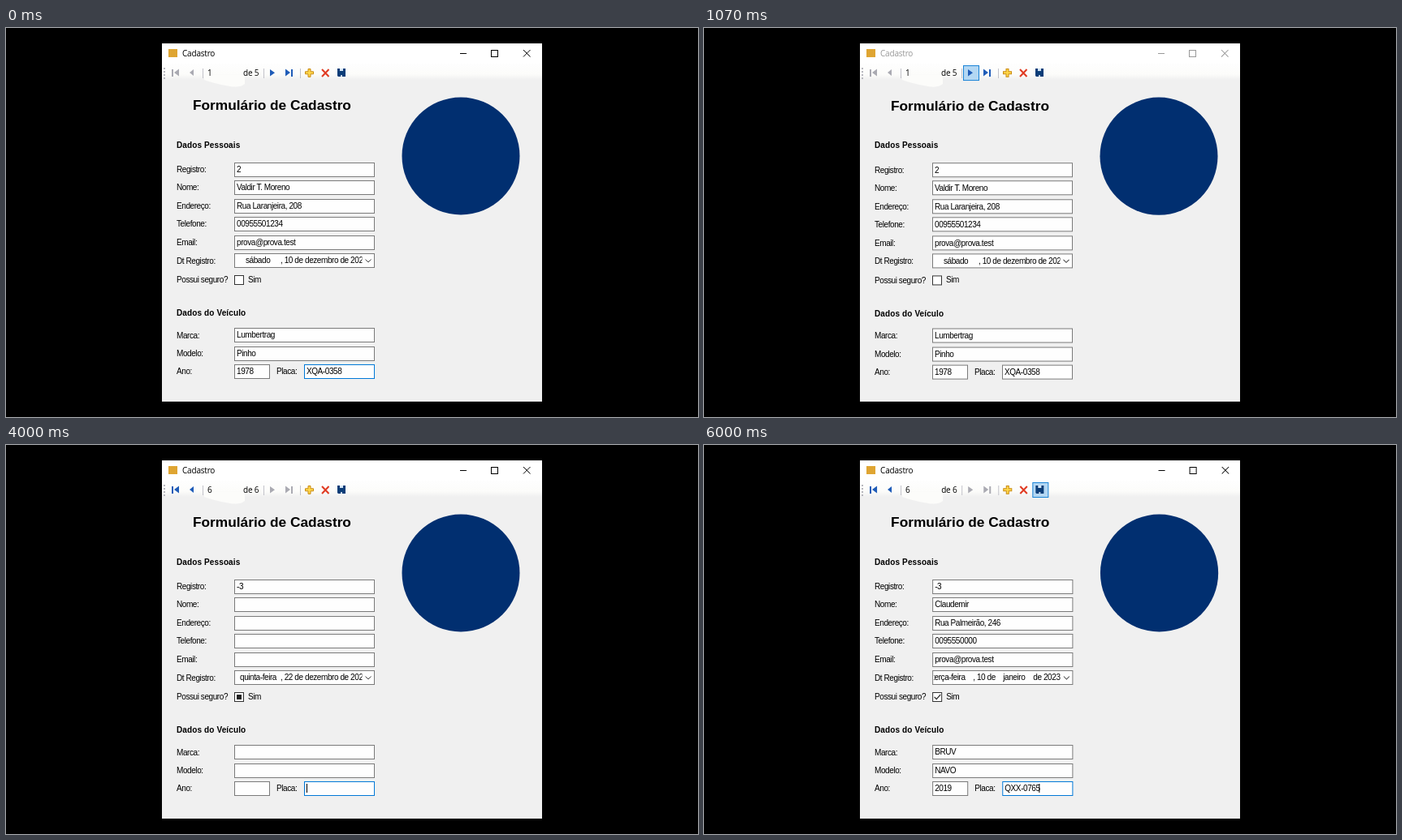
These frames come from a looping animation (852x480 px, 8 s). An HTML page:

```html
<!DOCTYPE html>
<html lang="pt-BR">
<head>
<meta charset="utf-8">
<title>Cadastro</title>
<style>
  html, body { margin: 0; width: 100%; height: 100%; overflow: hidden; background: #000; }
  svg { display: block; width: 100vw; height: 100vh; }
  text { font: 10px "Liberation Sans", Arial, sans-serif; letter-spacing: -.42px; fill: #000; }
  .head { font-size: 17.3px; font-weight: bold; letter-spacing: 0; }
  .sub { font-weight: bold; letter-spacing: .12px; }
  .ui { font: 10px "Open Sans", "Noto Sans", sans-serif; letter-spacing: -.2px; }
</style>
</head>
<body>
<svg viewBox="0 0 852 480">
  <defs>
    <linearGradient id="bar" x2="0" y2="1">
      <stop offset="0" stop-color="#fefefe"/>
      <stop offset=".65" stop-color="#fcfcfa"/>
      <stop offset="1" stop-color="#f0f0f0"/>
    </linearGradient>
    <clipPath id="window"><rect x="192" y="19" width="468" height="442"/></clipPath>
    <clipPath id="date"><rect x="283" y="279" width="155.5" height="17"/></clipPath>
  </defs>
  <rect width="852" height="480"/>
  <g clip-path="url(#window)">
    <rect x="192" y="19" width="468" height="442" fill="#f0f0f0"/>
    <g id="form"></g>
  </g>
</svg>
<script>
const LOOP = 8000;
const BLUE = '#1f5cb8', GREY = '#aaaab2', NAVY = '#012f70';

const first = {
  pos: 1, total: 5, check: 'off',
  fields: ['2', 'Valdir T. Moreno', 'Rua Laranjeira, 208', '00955501234', 'prova@prova.test'],
  date: [[295, 'sábado'], [338, ', 10 de dezembro de 2022']],
  car: ['Lumbertrag', 'Pinho', '1978', 'XQA-0358']
};
const second = {
  pos: 2, total: 5, check: 'on',
  fields: ['3', 'Marlucia de Campos', 'Av. Ipê Sul', '00955506789', ''],
  date: [[288, 'quinta-feira'], [338, ', 22 de dezembro de 2022']],
  car: ['Bruv', 'Lio Tar', '2014', 'XQT-0000']
};
const blank = {
  pos: 6, total: 6, check: 'mixed',
  fields: ['-3', '', '', '', ''],
  date: second.date,
  car: ['', '', '', '']
};
const filled = {
  pos: 6, total: 6, check: 'on',
  fields: ['-3', 'Claudemir', 'Rua Palmeirão, 246', '0095550000', 'prova@prova.test'],
  date: [[281, 'terça-feira'], [331, ', 10 de'], [368, 'janeiro'], [405, 'de 2023']],
  car: ['BRUV', 'NAVO', '2019', 'QXX-0765']
};

const scenes = [
  { at: 0, rec: first, active: true },
  { at: 1000, rec: first, hot: 319, sy: 1.0015 },
  { at: 2000, rec: second, hot: 319, sx: 1.0015 },
  { at: 3000, rec: second, hot: 364, sx: 1.0015 },
  { at: 4000, rec: blank, active: true, caret: 370.5 },
  { at: 6000, rec: filled, active: true, hot: 404, caret: 412.5, sx: 1.0015 }
];

const text = (x, y, s, cls = '', fill = '') =>
  `<text x="${x}" y="${y}" class="${cls}"${fill && ` style="fill:${fill}"`}>${s}</text>`;
const rect = (x, y, w, h, fill, stroke = 'none') =>
  `<rect x="${x}" y="${y}" width="${w}" height="${h}" fill="${fill}" stroke="${stroke}"/>`;
const line = (d, stroke, width = 1) =>
  `<path d="${d}" fill="none" stroke="${stroke}" stroke-width="${width}"/>`;
const shape = (d, fill, stroke = 'none') => `<path d="${d}" fill="${fill}" stroke="${stroke}"/>`;
const box = (x, y, w, value, border = '#7a7a7a') =>
  rect(x + .5, y + .5, w - 1, 17, '#fefefe', border) + text(x + 3, y + 12.4, value);

function titleBar(active) {
  const ink = active ? '#000' : '#999';
  return rect(192, 19, 470, 25, '#fff')
    + rect(200, 26, 11, 10, '#dfa532')
    + text(217, 35, 'Cadastro', 'ui', ink)
    + line('M559 31.5h8', ink)
    + rect(597.5, 27.5, 8, 8, 'none', ink)
    + line('M637 27l8.5 8.5m0-8.5l-8.5 8.5', ink);
}

function toolBar({ rec, hot }) {
  const back = rec.pos > 1 ? BLUE : GREY;
  const ahead = rec.pos < rec.total ? BLUE : GREY;
  let out = rect(192, 44, 470, 20, 'url(#bar)')
    + shape('M244 58H294V69Q288 74 276 72Q258 69 244 64Z', '#fcfcfa');
  for (let y = 49; y < 62; y += 4) out += rect(194, y, 2, 2, '#b8b8be');
  for (const x of [242, 317, 362]) out += line(`M${x}.5 50v12`, '#c3c3ca');
  if (hot) out += rect(hot + .5, 46.5, 19, 18, '#b3d7f3', '#1883d7');
  return out
    + rect(204, 51, 2, 9, back) + shape('M213 50.5v9l-6-4.5z', back)
    + shape('M231 51v8l-5-4z', back)
    + text(248, 59, rec.pos, 'ui') + text(292, 59, 'de ' + rec.total, 'ui')
    + shape('M325 51v8.5l6-4.2z', ahead)
    + shape('M344 50.5v9l6-4.5z', ahead) + rect(351, 51, 2, 9, ahead)
    + shape('M372 50.5h3v3.3h3.5v3h-3.5v3.5h-3v-3.5h-3.5v-3h3.5z', '#ffd84a', '#c98a12')
    + line('M389 51l8.5 9m0-9l-8.5 9', '#e03a22', 2)
    + shape('M408 50h10v10h-9l-1-1z', '#0b3d78')
    + rect(411, 50, 4, 3, '#d6e6f6') + rect(412, 58, 2, 2, '#c4d2e4');
}

function checkBox(kind) {
  let out = rect(281.5, 305.5, 11, 11, '#fff', '#333');
  if (kind === 'on') out += line('M283.5 310.8l2.6 2.8l5-5.8', '#222', 1.2);
  if (kind === 'mixed') out += rect(284, 308, 6, 6, '#222');
  return out;
}

function render(scene) {
  const { rec, active, caret, sx = 1, sy = 1 } = scene;
  const labels = ['Registro:', 'Nome:', 'Endereço:', 'Telefone:', 'Email:'];
  let out = titleBar(active) + toolBar(scene)
    + text(230, 101.4, 'Formulário de Cadastro', 'head')
    + `<circle cx="560" cy="158" r="72.5" fill="${NAVY}"/>`
    + text(210, 147.6, 'Dados Pessoais', 'sub');

  labels.forEach((label, i) => {
    const y = Math.round(166 + i * 22.4);
    out += text(210, y + 12.4, label) + box(281, y, 173, rec.fields[i]);
  });

  out += text(210, 291, 'Dt Registro:') + box(281, 278, 173, '')
    + '<g clip-path="url(#date)">'
    + rec.date.map(([x, s]) => text(x, 290.4, s)).join('') + '</g>'
    + line('M442.5 285.5l3.5 3.5l3.5-3.5', '#444')
    + text(210, 314.2, 'Possui seguro?') + checkBox(rec.check) + text(298, 314, 'Sim')
    + text(210, 355.4, 'Dados do Veículo', 'sub')
    + text(210, 382.6, 'Marca:') + box(281, 370, 173, rec.car[0])
    + text(210, 405, 'Modelo:') + box(281, 393, 173, rec.car[1])
    + text(210, 427.4, 'Ano:') + box(281, 415, 44, rec.car[2])
    + text(333, 427.4, 'Placa:')
    + box(367, 415, 87, rec.car[3], active ? '#0078d7' : '#7a7a7a');
  if (caret) out += line(`M${caret} 418v11`, '#000');

  form.setAttribute('transform', `translate(192 19) scale(${sx} ${sy}) translate(-192 -19)`);
  form.innerHTML = out;
}

const form = document.getElementById('form');
const start = performance.now();
let shown;

function tick() {
  const t = (performance.now() - start) % LOOP;
  const scene = scenes.filter(s => s.at <= t).pop();
  if (scene !== shown) render(shown = scene);
  requestAnimationFrame(tick);
}
tick();
</script>
</body>
</html>
```
